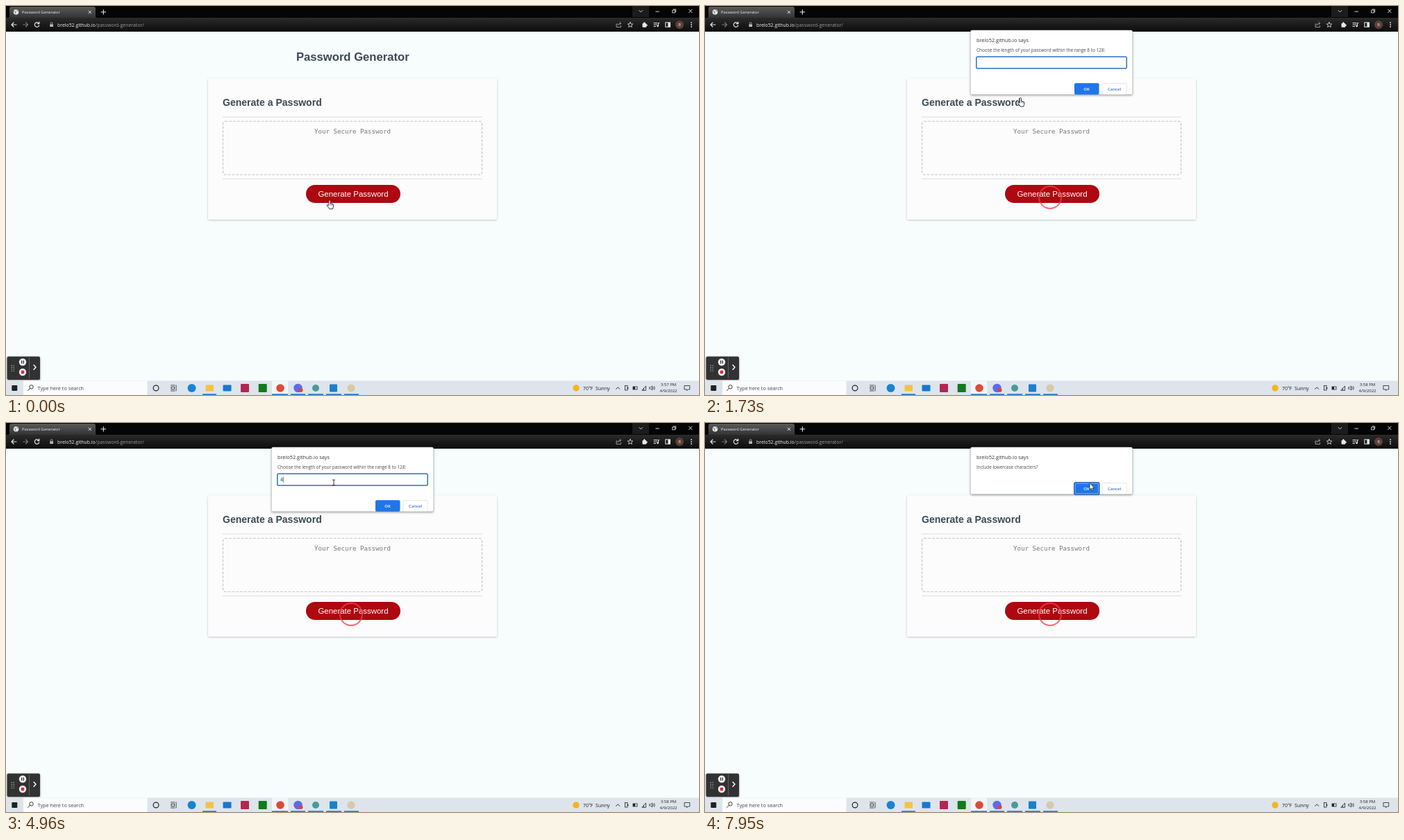
Recreate the animation shown at these times as an HTML page. Size 998 by 561 pixels, loop 7.99 s.

```html
<!DOCTYPE html>
<html lang="en">
<head>
<meta charset="utf-8">
<title>Password Generator</title>
<style>
  html, body { margin: 0; width: 100%; height: 100%; overflow: hidden; background: #f7fcfd; }
  svg { display: block; width: 100vw; height: 100vh; }
  text { font-family: "Open Sans", "Noto Sans", sans-serif; white-space: pre; }
  .arial { font-family: "Liberation Sans", Arial, sans-serif; }
  .mono { font-family: "DejaVu Sans Mono", monospace; }
  .line { fill: none; stroke-linecap: round; stroke-linejoin: round; }
</style>
</head>
<body>
<svg id="stage" viewBox="0 0 998 561" xmlns="http://www.w3.org/2000/svg"></svg>
<script>
const LOOP = 7990;
const HOST = 'brelo52.github.io';
const stage = document.getElementById('stage');

// Markup helpers
const rect = (x, y, w, h, fill, extra = '') =>
  `<rect x="${x}" y="${y}" width="${w}" height="${h}" fill="${fill}" ${extra}/>`;
const disc = (x, y, r, fill, extra = '') =>
  `<circle cx="${x}" cy="${y}" r="${r}" fill="${fill}" ${extra}/>`;
const line = (d, color, width = 1, extra = '') =>
  `<path class="line" d="${d}" stroke="${color}" stroke-width="${width}" ${extra}/>`;
const text = (x, y, size, fill, str, extra = '') =>
  `<text x="${x}" y="${y}" font-size="${size}" fill="${fill}" ${extra}>${str}</text>`;
const MID = 'text-anchor="middle"';

const defs = `<defs>
  <linearGradient id="tab" x2="0" y2="1"><stop stop-color="#5a5a5a"/><stop offset="1" stop-color="#333"/></linearGradient>
  <linearGradient id="bar" x2="0" y2="1"><stop stop-color="#2b2b2b"/><stop offset="1" stop-color="#0b0b0b"/></linearGradient>
  <filter id="soft" x="-10%" y="-10%" width="120%" height="125%"><feDropShadow dx="0" dy="1" stdDeviation="1.6" flood-opacity=".22"/></filter>
  <filter id="lift" x="-10%" y="-15%" width="120%" height="140%"><feDropShadow dx="0" dy="1.2" stdDeviation="1.8" flood-opacity=".4"/></filter>
</defs>`;

function browser() {
  const w = '#e8e8e8', g = '#b8b8b8';
  return rect(0, 0, 998, 18, '#050505') + rect(902, 0, 24, 16, '#1c1c1c') +
    rect(0, 17, 998, 20, 'url(#bar)') +
    '<path d="M3 17Q5 17 5 14V4Q5 1 8 1H126Q129 1 129 4V14Q129 17 131 17Z" fill="url(#tab)"/>' +
    disc(14.5, 8.8, 3.8, '#e6e6e6') + line('M12 7.5l2 1-.5 2M15.5 6l1.5 1.5', '#666', 1) +
    text(23, 11, 5.75, '#f0f0f0', 'Password Generator') +
    line('M119 7l3.6 3.6M122.6 7L119 10.6', w) +
    line('M137 8.8h6.6M140.3 5.5v6.6', w, 1.1) +
    line('M15 27H8.3M11 24l-3 3 3 3', w, 1.2) +
    line('M24.500 27h6.700M28.500 24l3 3-3 3', '#777', 1.2) +
    line('M47.200 25a3.300 3.300 0 1 0 .5 3M47.800 23v2.600h-2.600', w, 1.2) +
    rect(63.2, 26.200, 4.800, 3.800, g, 'rx=".6"') + line('M64.200 26v-1a1.400 1.400 0 0 1 2.800 0v1', g, .8) +
    `<text x="74" y="29.500" font-size="6.9" fill="#f2f2f2">${HOST}<tspan fill="#9a9a9a">/password-generator/</tspan></text>` +
    line('M880.500 26h-1.500v4.500h6.500v-2M881 28q.5-3 4-3M883.800 23.200l2 1.800-2 1.800', g, .8) +
    line('M899 23.300l1.100 2.500 2.700.2-2.100 1.800.7 2.700-2.400-1.500-2.400 1.500.7-2.700-2.100-1.800 2.700-.2z', w, .8) +
    rect(916.500, 25, 5.700, 5.700, w, 'rx=".8"') + disc(919.300, 24.600, 1.300, w) + disc(922.500, 27.700, 1.300, w) +
    line('M933 24.500h5M933 27h5M933 29.500h2.500M939.500 28.500v-4h1.300', w, 1) + disc(938.600, 29, 1.200, w) +
    rect(949.800, 23.800, 6.600, 6.400, 'none', `stroke="${w}"`) + rect(953.300, 24, 3, 6, w) +
    disc(970, 27, 6, '#5d4037') + text(970, 29, 5.6, '#eee', 'B', MID) +
    [24, 27, 30].map(y => disc(987, y, .9, w)).join('') +
    line('M912 6.500l2.300 2.300 2.300-2.300', w, .9) +
    line('M935.800 8h4.600', w, .9) +
    rect(959.700, 6, 3.800, 3.800, 'none', `stroke="${w}" stroke-width=".8"`) + line('M961 4.800h3.700v3.700', w, .8) +
    line('M983.500 5l4.600 4.600M988.100 5l-4.600 4.600', w, .9);
}

function page() {
  const ink = '#3b4a54', rule = '#d9dadd';
  return rect(0, 37, 998, 504, '#f7fcfd') +
    text(499.3, 78.500, 16.64, ink, 'Password Generator', `class="arial" font-weight="bold" ${MID}`) +
    rect(291, 104.500, 416, 203.500, '#fcfcfd', 'rx="2.500" filter="url(#soft)"') +
    text(312, 144, 14.04, ink, 'Generate a Password', 'class="arial" font-weight="bold"') +
    rect(312, 159.600, 374, .9, rule) + rect(312, 248.800, 374, .9, rule) +
    rect(312.500, 166.300, 373, 76.900, 'none', 'rx="3" stroke="#bfc3c9" stroke-width="1.100" stroke-dasharray="3.800 2"') +
    text(499, 184, 9.13, '#777', 'Your Secure Password', `class="mono" ${MID}`) +
    rect(432, 258, 136, 26, '#ae0810', 'rx="13"') +
    text(500, 275, 11.44, '#fff', 'Generate Password', `class="arial" ${MID}`);
}

function recorder() {
  return rect(1.500, 505.500, 47.500, 33.500, '#303033', 'rx="2" filter="url(#lift)"') +
    [0, 1, 2, 3].map(i => disc(8.300, 518.500 + i * 2.700, .7, '#bbb') + disc(11.200, 518.500 + i * 2.700, .7, '#bbb')).join('') +
    disc(24, 513.500, 5.200, '#f2f2f2') + rect(22, 511.300, 1.300, 4.400, '#333') + rect(24.700, 511.300, 1.300, 4.400, '#333') +
    disc(24, 528, 5.200, '#f2f2f2') + rect(21.800, 525.800, 4.400, 4.400, '#e0283a', 'rx=".5"') +
    rect(33.200, 507, .7, 30, '#77777a') + line('M40 517.800l3 3.200-3 3.200', '#fff', 1.400);
}

function taskbar() {
  const k = '#222';
  const square = (x, c, s = 11) => rect(x - s / 2, 551 - s / 2, s, s, c, 'rx="1"');
  const running = [[283, 20], [383, 23], [410, 21], [435, 22], [461, 22], [487, 21]];
  return rect(0, 540.500, 998, 20.500, '#dde4ec') + rect(25, 540.500, 178.500, 20.500, '#fbfcfd') +
    rect(383, 540.500, 23, 20.500, '#f3f6f9') +
    running.map(([x, w]) => rect(x, 559.400, w, 1.600, '#1b76c8')).join('') +
    square(12.300, k, 8) +
    disc(36.500, 549.300, 2.700, 'none', 'stroke="#222" stroke-width=".9"') + line('M34.500 551.500l-2.900 3', k, .9) +
    text(45.500, 553.600, 7.29, '#444', 'Type here to search') +
    disc(216, 551, 3.900, 'none', 'stroke="#222" stroke-width="1.200"') +
    rect(238, 549.300, 4.500, 3.500, 'none', 'stroke="#222" stroke-width=".8"') +
    line('M237.500 547h5.500M237.500 555h5.500M245 547v8', k, .8) +
    disc(267.500, 551, 6, '#1784d0') + rect(287.500, 546.500, 11.500, 9, '#f5c342', 'rx="1"') +
    rect(312.500, 546.500, 12, 9, '#1678cf', 'rx="1"') + square(344, '#b3264f', 12) + square(369.700, '#127a1c', 12) +
    disc(395, 551, 5.800, '#df4a36') + disc(420.500, 551, 6.200, '#5b6bea') + disc(424.500, 554, 3, '#e33d45') +
    disc(446, 551, 5, '#4c9a96') + square(471.500, '#1c7fcb') + disc(497, 551, 5.600, '#d8c9a8') +
    disc(821, 551, 4.700, '#f5b51f') +
    text(831, 553.600, 6.9, k, '70°F') + text(849, 553.600, 7.15, k, 'Sunny') +
    line('M878.500 552.500l2.700-2.700 2.700 2.700', k, .9) +
    rect(891.500, 547.500, 3.500, 6.500, 'none', 'stroke="#222" stroke-width=".8"') + disc(895.500, 551, 1, k) +
    rect(903, 549, 6, 4, 'none', 'stroke="#222" stroke-width=".8"') + rect(903, 549, 3, 4, k) +
    line('M916 554l5.500-6v6zM918.500 554v-2.500', k, .8) +
    line('M927 549.800h1.500l2-1.800v6l-2-1.800H927zM932 549.500q1 1.500 0 3M933.600 548.500q1.700 2.500 0 5', k, .7) +
    '<text id="clock" x="954" y="548.300" font-size="6" fill="#222" text-anchor="middle"></text>' +
    text(954, 557.300, 6, k, '4/9/2022', MID) +
    line('M977.300 547.500h7.400v5.500h-2.500l-1.700 1.700v-1.700h-3.200z', k, .8);
}

function dialog(id, height, message, body) {
  const y = 17 + height;
  const focus = id === 'confirm'
    ? rect(531.800, y + 1.300, 36, 17.400, 'none', 'rx="2" stroke="#1f5fae" stroke-width="1.500"') +
      rect(533, y + 2.500, 33.600, 15, 'none', 'rx="1.500" stroke="#bcd6f8" stroke-width=".6"') : '';
  return `<g id="${id}">` +
    rect(382.500, 35, 233, height, '#fff', 'rx="2" stroke="#b9bcc0" stroke-width=".5" filter="url(#lift)"') +
    text(391, 52, 7.35, '#33373b', `${HOST} says`) + text(391, 66.300, 6.4, '#45494d', message) + body +
    rect(532, y + 1.700, 35.500, 16.600, '#1f76e6', 'rx="2"') + focus +
    text(549.500, y + 12.200, 6, '#fff', 'OK', `font-weight="600" ${MID}`) +
    rect(572, y + 2, 35.200, 16, '#fff', 'rx="2" stroke="#dadce0" stroke-width=".7"') +
    text(589.500, y + 12.200, 6, '#3f6fc0', 'Cancel', `font-weight="600" ${MID}`) + '</g>';
}

const field = rect(390.800, 73.200, 216.400, 16.800, '#fff', 'rx="1.500" stroke="#2b70c4" stroke-width="1.500"') +
  '<text id="value" x="395" y="84" font-size="6.7" fill="#333"></text>' + rect(0, 77.500, .7, 8, '#222', 'id="caret"');

const cursors =
  '<g id="hand"><path d="M-1.200 .8a1.200 1.200 0 0 1 2.400 0V4.300l3.200.8q1.300.4 1.200 1.700l-.4 2.900-.8 2.500H-.2l-1.600-2.400-1.900-2.400q-.5-1.300.8-1.300l1.700 1.200z" fill="#fff" stroke="#222" stroke-width=".9"/>' +
  line('M1.200 4.300v2.500M3 5v2M4.600 5.500v1.700', '#222', .5) + '</g>' +
  '<path id="arrow" d="M0 0V9.800L2.200 7.700 3.700 11.200 5.300 10.500 3.800 7.200H6.900Z" fill="#fff" stroke="#222" stroke-width=".8"/>' +
  `<g id="beam">${line('M-1.600-4h1.200L0-3.600.4-4h1.200M0-3.600V3.600M-1.600 4h1.200L0 3.600.4 4h1.200', '#222', .9)}</g>`;

stage.innerHTML = defs + page() + browser() + recorder() + taskbar() +
  disc(497, 276, 16, 'none', 'id="ring" stroke="#f0404c" stroke-opacity=".75" stroke-width="2"') +
  dialog('prompt', 92.5, 'Choose the length of your password within the range 8 to 128:', field) +
  dialog('confirm', 67.5, 'Include lowercase characters?', '') + cursors;

const el = id => document.getElementById(id);
const ui = Object.fromEntries(['clock', 'ring', 'prompt', 'confirm', 'value', 'caret', 'hand', 'arrow', 'beam'].map(id => [id, el(id)]));
const show = (node, on) => node.setAttribute('visibility', on ? 'inherit' : 'hidden');
const clamp = v => Math.max(0, Math.min(1, v));

// Pointer stops: time, x, y
const stops = [[0, 466, 280.5], [800, 495, 274.5], [1200, 495, 274.5], [1730, 454.3, 132.8], [2300, 450, 84],
  [3540, 452, 84], [4300, 470, 86], [4960, 472, 86], [5700, 472, 86], [6500, 543.8, 112.8],
  [6850, 543.8, 112.8], [7500, 554, 86.5], [LOOP, 554, 86.5]];
const shapes = [[0, 'hand'], [870, 'arrow'], [1150, 'hand'], [2080, 'beam'], [5920, 'arrow'], [6330, 'hand'], [6850, 'arrow']];
const keys = [[0, ''], [4850, '4'], [5150, '49']];
const current = (list, t) => list.filter(s => s[0] <= t).pop();

function pointer(t) {
  const i = Math.max(1, stops.findIndex(s => s[0] > t));
  const [t0, x0, y0] = stops[i - 1], [t1, x1, y1] = stops[i];
  const p = clamp((t - t0) / (t1 - t0)), e = p * p * (3 - 2 * p);
  return [x0 + (x1 - x0) * e, y0 + (y1 - y0) * e];
}

// away: 0 = settled, 1 = gone
function place(node, away, alpha, grow) {
  show(node, alpha > 0);
  node.setAttribute('opacity', alpha);
  node.setAttribute('transform', `translate(499 ${35 - 10 * away}) scale(${1 + grow * away}) translate(-499 -35)`);
}

function draw(t) {
  ui.clock.textContent = t < 850 ? '3:57 PM' : '3:58 PM';
  show(ui.ring, t >= 830);

  const enter = clamp((t - 830) / 160), leave = clamp((t - 6720) / 160), next = clamp((t - 6715) / 160);
  if (leave > 0) place(ui.prompt, leave, 1 - leave, .02);
  else place(ui.prompt, 1 - enter, clamp(enter * 1.25), .012);
  place(ui.confirm, 1 - next, clamp(next * 1.25), .008);

  const [since, value] = current(keys, t);
  ui.value.textContent = value;
  ui.caret.setAttribute('x', 395 + value.length * 3.85);
  show(ui.caret, t < 6650 && (t - (since || 900) + 1000) % 1000 < 500);
  if (t < 830 || leave >= 1) show(ui.caret, false);

  const shape = current(shapes, t)[1], [x, y] = pointer(t);
  for (const id of ['hand', 'arrow', 'beam']) show(ui[id], id === shape);
  ui[shape].setAttribute('transform', `translate(${x} ${y})`);
}

const start = performance.now();
function tick() {
  draw((performance.now() - start) % LOOP);
  requestAnimationFrame(tick);
}
tick();
</script>
</body>
</html>
```
